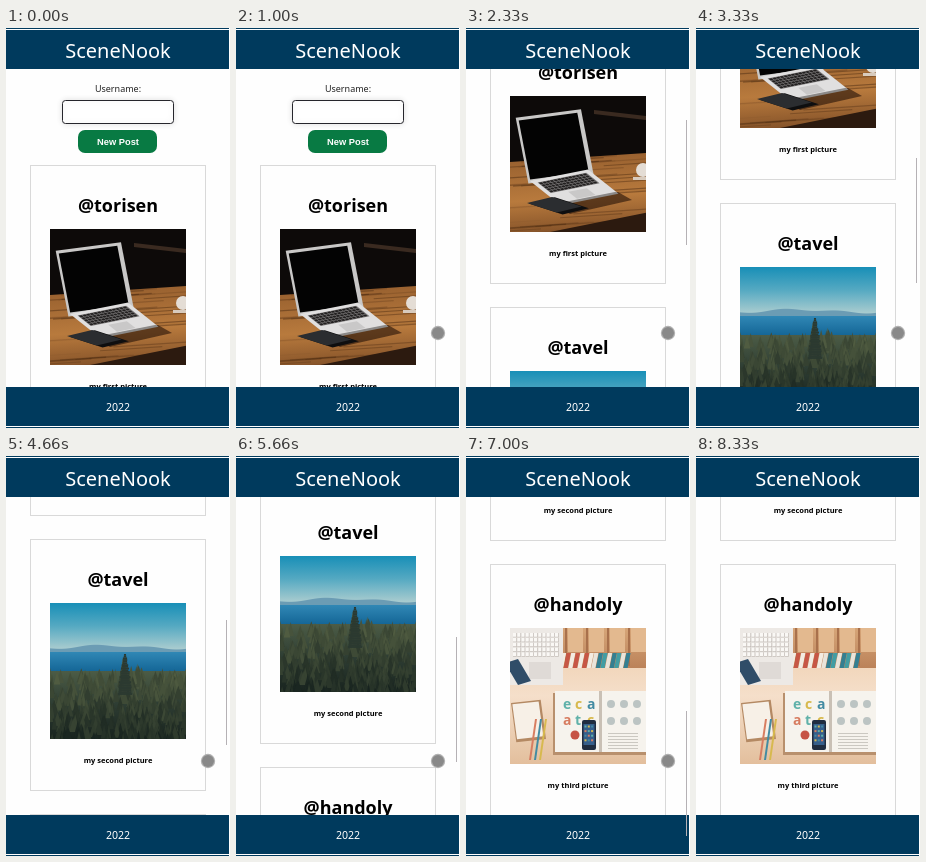
An HTML page with a canvas that plays this animation: 224 by 400 pixels, repeating every 9.33 s.

```html
<!DOCTYPE html>
<html lang="en">
<head>
<meta charset="utf-8">
<title>Photo wall</title>
<style>
  html, body { margin: 0; width: 100%; height: 100%; overflow: hidden; background: #fefefe; }
  canvas { display: block; width: 224px; height: 400px; }
</style>
</head>
<body>
<canvas id="stage" width="224" height="400"></canvas>
<script>
const LOOP = 9330;
const FRAME = 1000 / 3;
const SIZE = 136;
const NAVY = '#003a5d';
const SANS = '"Noto Sans", "Open Sans", sans-serif';
const ctx = document.getElementById('stage').getContext('2d');

// Recording frame and scroll offset at the end of each swipe; the finger rests in between
const STOPS = [[3, 0], [5, 121], [7, 133], [10, 237], [14, 329], [19, 447], [21, 579]];
const RESTS = [9, 11, 13, 17];

function scrollAt(t) {
  let frame = Math.floor((t + 7) / FRAME);
  if (RESTS.includes(frame)) frame--;
  const next = STOPS.findIndex(([stop]) => frame <= stop);
  if (next <= 0) return next ? STOPS.at(-1)[1] : 0;
  const [f1, y1] = STOPS[next - 1];
  const [f2, y2] = STOPS[next];
  return Math.round(y1 + (y2 - y1) * (frame - f1) / (f2 - f1));
}

function rect(c, color, x, y, w, h) {
  c.fillStyle = color;
  c.fillRect(x, y, w, h);
}

function circle(c, color, x, y, r) {
  c.fillStyle = color;
  c.beginPath();
  c.arc(x, y, r, 0, Math.PI * 2);
  c.fill();
}

function roundBox(c, fill, x, y, w, h, r, stroke = fill) {
  c.beginPath();
  c.roundRect(x, y, w, h, r);
  c.fillStyle = fill;
  c.fill();
  c.strokeStyle = stroke;
  c.lineWidth = 1;
  if (stroke !== fill) c.stroke();
}

// Paints in unit coordinates on a parallelogram with a corner and two edge vectors
function plane(c, [x, y], [ux, uy], [vx, vy], paint) {
  c.save();
  c.transform(ux, uy, vx, vy, x, y);
  paint();
  c.restore();
}

function grid(cols, rows, paint) {
  for (let i = 0; i < cols * rows; i++) paint(i % cols, Math.floor(i / cols), i);
}

function fade(c, y1, y2, ...colors) {
  const g = c.createLinearGradient(0, y1, 0, y2);
  colors.forEach((color, i) => g.addColorStop(i / (colors.length - 1), color));
  return g;
}

function seeded(seed) {
  return () => (seed = (seed * 16807) % 2147483647) / 2147483647;
}

function label(text, y, font, color, x = 112) {
  ctx.font = font;
  ctx.fillStyle = color;
  ctx.textAlign = 'center';
  ctx.fillText(text, x, y);
}

function photo(paint) {
  const canvas = document.createElement('canvas');
  canvas.width = canvas.height = SIZE;
  paint(canvas.getContext('2d'));
  return canvas;
}

function laptop(c) {
  const rand = seeded(19);
  rect(c, '#0d0a09', 0, 0, SIZE, SIZE);
  plane(c, [84, 14], [52, 6], [0, 4], () => rect(c, '#3a2a20', 0, 0, 1, 1));

  // wooden table with grain and a dark front edge
  plane(c, [0, 66], [SIZE, -9], [0, 80], () => {
    rect(c, fade(c, 0, 1, '#9a6230', '#b87a3d', '#7b4b25'), 0, 0, 1, 1);
    for (let i = 0; i < 40; i++) {
      rect(c, `rgba(50, 25, 8, ${rand() * .4})`, rand() - .3, rand(), .3 + rand() * .5, .015);
    }
  });
  plane(c, [20, 140], [120, -24], [0, 30], () => rect(c, '#2c1a0f', 0, 0, 1, 1));
  plane(c, [46, 110], [62, -14], [14, 8], () => rect(c, 'rgba(35, 18, 8, .6)', 0, 0, 1, 1));

  circle(c, '#e4ddd5', 133, 74, 7);
  rect(c, '#d8cbbd', 123, 81, 13, 3);

  plane(c, [8, 24], [61, -8], [12, 62], () => {
    rect(c, '#c9c8c7', -.03, -.04, 1.07, 1.06);
    rect(c, '#030303', .01, .01, .96, .95);
  });
  plane(c, [20, 85], [58, -11.5], [29, 23], () => {
    rect(c, '#e0dfdf', 0, 0, 1, 1);
    rect(c, '#8b8988', 0, .97, 1, .08);
    rect(c, '#767474', .08, .1, .84, .46);
    grid(13, 5, (x, y) => rect(c, '#211f1f', .09 + x * .063, .12 + y * .088, .05, .065));
    rect(c, '#c9c8c8', .34, .64, .32, .3);
  });
  plane(c, [17, 107], [25, -6], [31, 10], () => {
    rect(c, '#0e0e0f', 0, .05, 1.05, 1.1);
    rect(c, '#2b2d30', 0, 0, 1, .96);
  });
}

function forest(c) {
  const rand = seeded(71);
  rect(c, fade(c, 0, 46, '#188fb7', '#55a9c2', '#a9cccf'), 0, 0, SIZE, 52);
  rect(c, fade(c, 47, 70, '#338bb8', '#126394'), 0, 48, SIZE, 30);
  for (let x = 0; x < SIZE; x++) {
    const peak = 44 + Math.sin(x / 9) + Math.sin(x / 21 + 2) * 1.5;
    rect(c, '#6b9cb4', x, peak, 1, 49 - peak);
  }
  rect(c, fade(c, 66, SIZE, '#4e5e47', '#2e3d33', '#18231e'), 0, 68, SIZE, 68);

  // trees get darker towards the viewer, the tallest stands past the middle
  for (let i = 0; i < 420; i++) {
    const depth = i / 420;
    const x = rand() * SIZE;
    const crest = 14 * Math.exp(-(((x - 74) / 16) ** 2));
    const y = 65 + depth * 66 - crest * (1 - depth) * rand();
    const shade = (1 - depth) * 38 + rand() * 26;
    const width = 2 + rand() * 3;
    c.fillStyle = `rgb(${20 + shade}, ${32 + shade}, ${29 + shade * .6})`;
    c.beginPath();
    c.moveTo(x, y);
    c.lineTo(x + width, y + 14);
    c.lineTo(x - width, y + 14);
    c.fill();
  }
  for (let k = 0; k < 24; k++) {
    const width = 2 + k * .45 + rand() * 3;
    rect(c, '#2b3930', 75 - width / 2, 51 + k * 1.7, width, 1.8);
  }
}

function desk(c) {
  const inks = ['#5fb1a9', '#d7b94e', '#438ba2', '#d77d61'];
  rect(c, fade(c, 0, SIZE, '#edcba8', '#f5dfca', '#e3bf9d'), 0, 0, SIZE, SIZE);

  // shelf with leaning books
  rect(c, fade(c, 0, 40, '#d6a578', '#bb8259'), 50, 0, 86, 40);
  for (let i = 0; i < 4; i++) {
    rect(c, '#e3b98f', 58 + i * 21, 0, 15, 24);
    rect(c, '#a9714c', 55 + i * 21, 0, 2, 38);
  }
  for (let i = 0; i < 15; i++) {
    const color = i > 6 ? ['#429da3', '#e9e4da', '#347f91'][i % 3] : ['#f3ece1', '#c75745'][i % 2];
    plane(c, [52 + i * 4.6, 25], [4.2, 0], [-3, 15], () => rect(c, color, 0, 0, 1, 1));
  }

  // keyboard and blue notebook
  rect(c, '#ede9e5', 0, 0, 53, 57);
  grid(11, 5, (x, y) => {
    rect(c, '#bdb6b1', 3 + x * 4.2, 5 + y * 4.8, 3.8, 4.4);
    rect(c, '#faf8f5', 3 + x * 4.2, 5 + y * 4.8, 3.2, 3.8);
  });
  rect(c, '#dfdad6', 19, 34, 22, 17);
  plane(c, [-5, 35], [13, -4], [13, 22], () => rect(c, '#304d68', 0, 0, 1, 1));

  // sketch pad and pencils
  plane(c, [1, 75], [28, -3], [5, 37], () => {
    rect(c, '#b48963', 0, 0, 1.06, 1.06);
    rect(c, '#f7f0e7', .04, .04, .94, .94);
  });
  for (let i = 0; i < 3; i++) {
    plane(c, [25 + i * 5, 91], [2, 0], [-6, 41], () => rect(c, inks[3 - i], 0, 0, 1, 1));
  }

  // open magazine with a phone on top
  rect(c, '#b8906d', 43, 65, 93, 62);
  for (const x of [45, 92]) rect(c, '#f6f3ed', x, 63, 44, 61);
  rect(c, '#c9c0b5', 89, 63, 3, 61);
  c.font = 'bold 14px ' + SANS;
  [...'ecaatc'].forEach((letter, i) => {
    c.fillStyle = inks[i % 4];
    c.fillText(letter, 53 + (i % 3) * 12, 81 + Math.floor(i / 3) * 16);
  });
  circle(c, '#c65345', 65, 107, 4.5);
  grid(3, 2, (x, y) => circle(c, '#bcc4c3', 101 + x * 13, 76 + y * 17, 4));
  for (let y = 105; y < 121; y += 3) rect(c, '#cbc8c1', 98, y, 30, 1);
  roundBox(c, '#202d40', 72, 92, 14, 30, 2);
  rect(c, '#365f8b', 73.5, 96, 11, 21);
  grid(3, 4, (x, y, i) => rect(c, inks[i % 4], 74.5 + x * 3.3, 97.5 + y * 4.6, 2, 2));
}

const POSTS = [
  { name: '@torisen', caption: 'my first picture', image: photo(laptop) },
  { name: '@tavel', caption: 'my second picture', image: photo(forest) },
  { name: '@handoly', caption: 'my third picture', image: photo(desk) }
];

function drawForm() {
  label('Username:', 64, '9px ' + SANS, '#222');
  ctx.save();
  ctx.shadowColor = 'rgba(0, 0, 0, .12)';
  ctx.shadowBlur = 6;
  roundBox(ctx, '#fff', 56.5, 72.5, 111, 23, 3, '#26262c');
  ctx.restore();
  roundBox(ctx, '#087a43', 72, 102, 79, 23, 7);
  label('New Post', 117, 'bold 9.3px "Liberation Sans", Arial, sans-serif', '#fff');
}

function drawPost(post, top) {
  ctx.strokeStyle = '#d9d9d9';
  ctx.lineWidth = 1;
  ctx.strokeRect(24.5, top + .5, 175, 251);
  label(post.name, top + 46.5, 'bold 18px ' + SANS, '#000');
  ctx.drawImage(post.image, 44, top + 64);
  label(post.caption, top + 224, 'bold 7.5px ' + SANS, '#000');
}

function drawBars() {
  for (const [top, edge] of [[0, 1], [359, 398]]) {
    rect(ctx, NAVY, 0, top, 223, 41);
    rect(ctx, '#fff', 0, edge, 223, 1);
  }
  label('SceneNook', 30, '20px ' + SANS, '#fff');
  label('2022', 383, '10.6px ' + SANS, '#fff');
}

function draw(t) {
  const scroll = scrollAt(t);
  rect(ctx, '#fefefe', 0, 0, 224, 400);
  ctx.save();
  ctx.translate(0, -scroll);
  drawForm();
  POSTS.forEach((post, i) => drawPost(post, 137 + i * 275));
  ctx.restore();
  drawBars();

  if (t >= 1330 && t < 7660) {
    rect(ctx, '#b5b1b5', 220, Math.round(43.5 + scroll * .365), 1, 125);
  }
  if (t >= 660 && t < 8330) {
    circle(ctx, '#b2b2b2', 202, 305, 7.2);
    circle(ctx, '#898989', 202, 305, 6);
  }
}

function tick() {
  draw(performance.now() % LOOP);
  requestAnimationFrame(tick);
}
tick();
</script>
</body>
</html>
```
